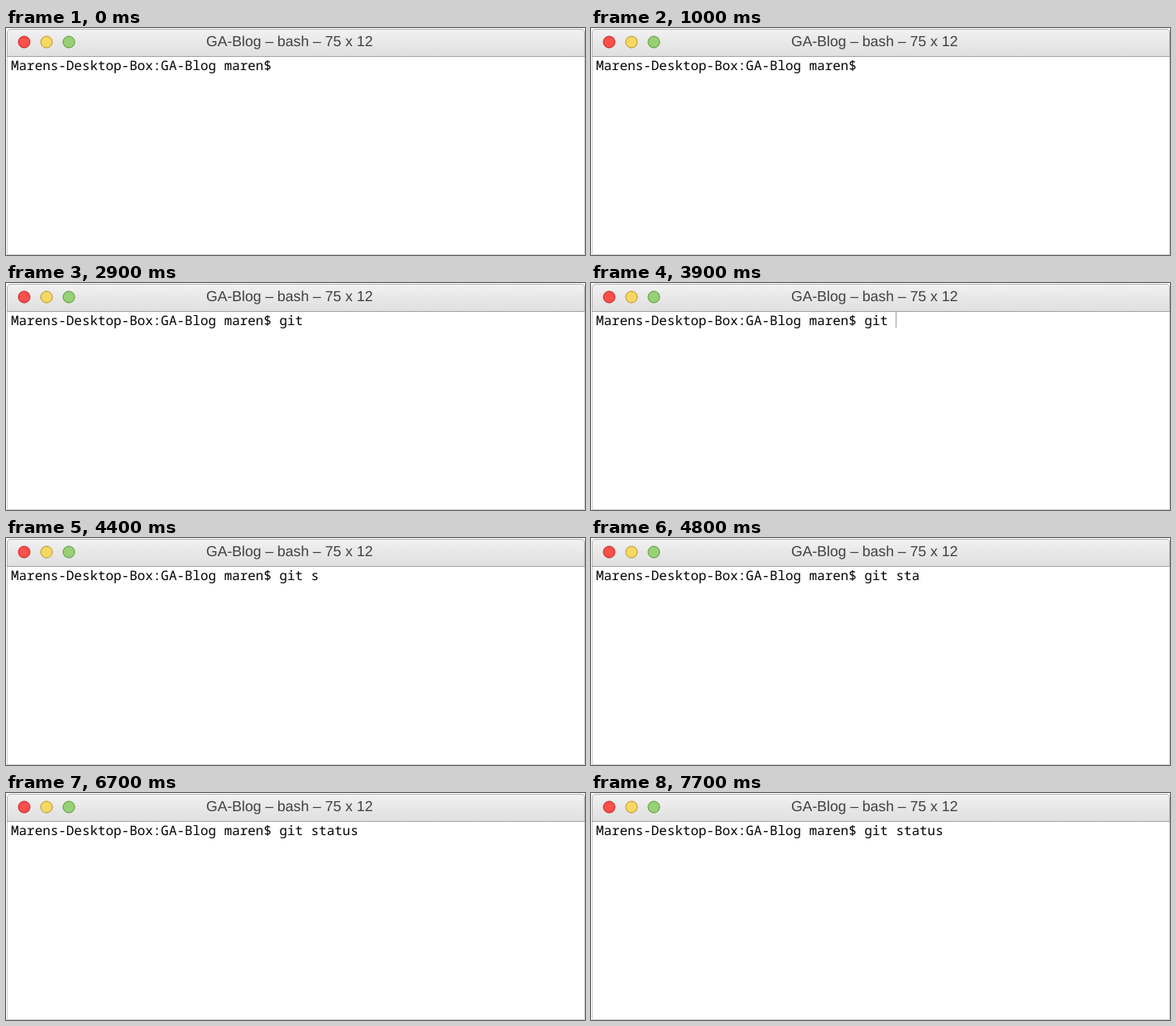
An HTML page for the animation above (8000 ms loop, 700 by 275 pixels).

```html
<!DOCTYPE html>
<html lang="en">
<head>
<meta charset="utf-8">
<title>Terminal</title>
<style>
  html, body { margin: 0; width: 100%; height: 100%; overflow: hidden; background: #fff; }
  svg { display: block; }
  text { text-rendering: geometricPrecision; }
  #title { font: 17.6px "Liberation Sans", Arial, sans-serif; fill: #404040; }
  #line { font: 15.92px "Noto Sans Mono", monospace; fill: #000; }
</style>
</head>
<body>
<svg width="700" height="275" viewBox="0 0 700 275">
  <defs>
    <linearGradient id="bar" x1="0" y1="0" x2="0" y2="1">
      <stop offset="0" stop-color="#f1f1f1"/>
      <stop offset="1" stop-color="#dfdfdf"/>
    </linearGradient>
  </defs>
  <path d="M1.5 34V274.5H699.5V34" fill="#fff" stroke="#d0d0d0"/>
  <path d="M1.5 34.5V6Q1.5 1.5 6 1.5H695Q699.5 1.5 699.5 6V34.5Z" fill="url(#bar)" stroke="#b4b4b4"/>
  <path d="M1 34.5H700" stroke="#a4a4a4"/>
  <circle cx="22" cy="17" r="7" fill="#fc504b" stroke="#c4171a"/>
  <circle cx="49" cy="17" r="7" fill="#f6d863" stroke="#b8922a"/>
  <circle cx="76" cy="17" r="7" fill="#98d075" stroke="#559a35"/>
  <text id="title" x="242" y="22">GA-Blog – bash – 75 x 12</text>
  <text id="line" x="6" y="50.5"></text>
  <rect id="caret" y="35" width="1" height="19" fill="#8c8c8c"/>
</svg>
<script>
const LOOP = 8000, KEY = 200, BEAT = 500;
const LEFT = 5.5, ADVANCE = 9.55;
const PROMPT = "Marens-Desktop-Box:GA-Blog maren$ ";

const steps = [];
let text = PROMPT, clock = 0;

// A caret is given by its text column; null hides it.
function hold(ms, caret = null) {
  steps.push({ start: clock, text, caret });
  clock += ms;
}

function blink(beats, on, caret) {
  for (let i = 0; i < beats; i++, on = !on) hold(BEAT, on ? caret : null);
}

// Keys come quickly, with a longer rest after the last one.
function type(keys) {
  [...keys].forEach((key, i) => {
    text += key;
    hold(i < keys.length - 1 ? KEY : BEAT);
  });
}

blink(5, false, PROMPT.length - 0.4);
type("git");
blink(1, true, text.length);
text += " ";
blink(1, true, text.length);
type("statu");
type("s");
blink(4, true, text.length);

const line = document.getElementById("line");
const caret = document.getElementById("caret");

function draw(now) {
  const time = now % LOOP;
  const step = steps.findLast(({ start }) => start <= time);
  line.textContent = step.text;
  caret.setAttribute("x", LEFT + ADVANCE * step.caret);
  caret.setAttribute("visibility", step.caret === null ? "hidden" : "visible");
}

function tick() {
  draw(performance.now());
  requestAnimationFrame(tick);
}
tick();
</script>
</body>
</html>
```
